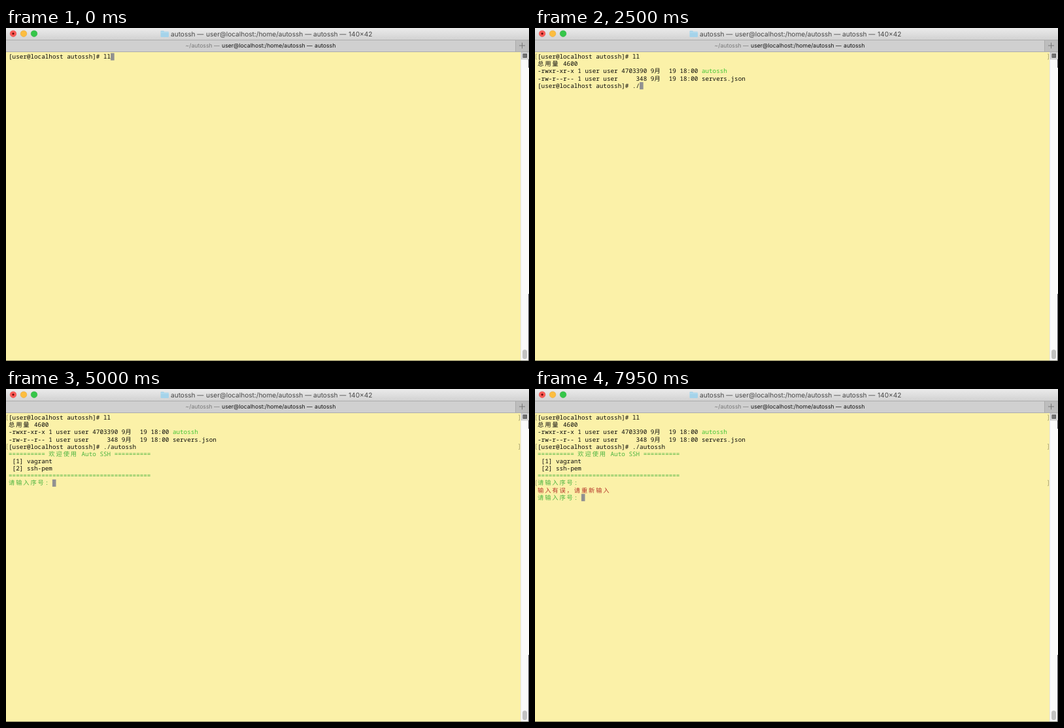
An HTML page that plays this animation: 800x511 px, repeating every 8000 ms.

```html
<!DOCTYPE html>
<html lang="en">
<head>
<meta charset="utf-8">
<title>Terminal session</title>
<style>
  html, body { margin: 0; width: 100%; height: 100%; overflow: hidden; background: #fbf1a8; }
  svg { display: block; width: 800px; height: 511px; }
  text { white-space: pre; text-rendering: geometricPrecision; }
  .title { font: 400 10.1px Inter, Roboto, sans-serif; fill: #474747; }
  .tab { font: 400 8.7px Inter, Roboto, sans-serif; fill: #111; }
  .tab .dim { fill: #777; }
  #screen { font: 500 9.29px "Noto Sans Mono", "Noto Sans CJK SC", "Noto Sans CJK", monospace; }
</style>
</head>
<body>
<svg viewBox="0 0 800 511">
  <defs>
    <linearGradient id="bar" x2="0" y2="1">
      <stop stop-color="#ebebeb"/>
      <stop offset="1" stop-color="#d2d2d2"/>
    </linearGradient>
  </defs>
  <rect width="800" height="511" fill="#fbf1a8"/>

  <rect width="800" height="18" fill="url(#bar)"/>
  <rect y="18" width="800" height="19" fill="#d0d0d0"/>
  <rect x="780" y="18" width="20" height="18" fill="#bdbdbd"/>
  <path d="M0 18.5H800M0 36.5H800M779.5 18V36" stroke="#acacac"/>
  <path d="M785 27H794M789.5 22.5V31.5" stroke="#777"/>

  <g stroke-width=".5">
    <circle cx="11" cy="8.7" r="4.8" fill="#fc5b56" stroke="#df4642"/>
    <circle cx="27" cy="8.7" r="4.8" fill="#fdbd3f" stroke="#dda034"/>
    <circle cx="43" cy="8.7" r="4.8" fill="#35c649" stroke="#27a835"/>
  </g>
  <circle cx="11" cy="8.7" r="1.6" fill="#6b0d0a"/>

  <path d="M236.5 5.2q0-.9.9-.9h3.6l1.3 1.2h5.8q.9 0 .9.9v6.6q0 .9-.9.9h-10.7q-.9 0-.9-.9z" fill="#a5d3ea"/>
  <path d="M236.5 6.9H249" stroke="#bfe1f1" stroke-width=".8"/>

  <g class="title">
    <text x="252" y="12.8">autossh —</text>
    <text x="306" y="12.8">user@localhost:/home/autossh —</text>
    <text x="470" y="12.8">autossh —</text>
    <text x="524" y="12.8">140×42</text>
  </g>
  <g class="tab">
    <text class="dim" x="274.5" y="30.2">~/autossh —</text>
    <text x="330" y="30.2">user@localhost:/home/autossh —</text>
    <text x="472" y="30.2">autossh</text>
  </g>

  <rect x="787" y="37" width="13" height="474" fill="#fafafa"/>
  <path d="M787.5 37V511" stroke="#e4e4e4"/>
  <rect x="790" y="493.5" width="7" height="14.5" rx="3.5" fill="#c2c2c2"/>
  <rect x="788.5" y="37.5" width="11" height="10.5" fill="#d9d9d9" stroke="#b5b5b5" stroke-width=".6"/>
  <rect x="790.5" y="39.5" width="6.5" height="6" fill="#444"/>
  <path d="M791 41.5H796.5M791 43.5H796.5" stroke="#ccc" stroke-width=".7"/>
  <path d="M799.5 48V61M799.5 408V511" stroke="#55555c"/>
  <path d="M0 510.6H800" stroke="#55533f" stroke-width=".8"/>

  <g id="screen"></g>
</svg>
<script>
const LOOP = 8000, CELL = 5.575, ROW = 11.14, LEFT = 4, TOP = 38.5;
const BLACK = '#0a0a08', LIME = '#43c535', GREEN = '#4cb440', RED = '#b5362a';

const prompt = '[user@localhost autossh]# ';
const ask = ['请输入序号: ', GREEN];
const command = text => [[prompt + text, BLACK]];
const listing = [
  command('ll'),
  [['总用量 4600', BLACK]],
  [['-rwxr-xr-x 1 user user 4703390 9月  19 18:00 ', BLACK], ['autossh', LIME]],
  [['-rw-r--r-- 1 user user     348 9月  19 18:00 servers.json', BLACK]]
];
const typed = text => [...listing, command(text)];
const menu = [
  ...typed('./autossh'),
  [['='.repeat(10) + ' 欢迎使用 Auto SSH ' + '='.repeat(10), GREEN]],
  [[' [1] vagrant', BLACK]],
  [[' [2] ssh-pem', BLACK]],
  [['='.repeat(39), GREEN]],
  [ask]
];

// start time, lines on screen, rows with a prompt mark
const steps = [
  [0, [command('ll')], []],
  [400, typed(''), [0]],
  [2100, typed('.'), [0]],
  [2300, typed('./'), [0]],
  [2700, typed('./a'), [0]],
  [2900, typed('./au'), [0]],
  [3200, typed('./autossh '), [0]],
  [3700, typed('./autossh '), [0, 4]],
  [4300, menu, [0, 4]],
  [7800, [...menu, [['输入有误，请重新输入', RED]], [ask]], [0, 4, 9]]
];

const screen = document.getElementById('screen');

function add(tag, attributes, content = '') {
  const node = document.createElementNS(screen.namespaceURI, tag);
  for (const key in attributes) node.setAttribute(key, attributes[key]);
  node.textContent = content;
  screen.append(node);
}

// Wide characters take two cells.
function drawLine(runs, row) {
  let column = 0;
  for (const [content, fill] of runs) {
    const x = [...content].map(char => {
      const left = LEFT + column * CELL;
      column += char > '\u2e80' ? 2 : 1;
      return left.toFixed(2);
    });
    add('text', { x: x.join(' '), y: TOP + row * ROW + 8.6, fill }, content);
  }
  return column;
}

function drawMark(row) {
  const y = TOP + row * ROW + 1.5;
  add('path', {
    d: `M3 ${y}H1.5v8H3M784 ${y}h1.5v8H784`,
    fill: 'none', stroke: '#a39d73', 'stroke-width': .8
  });
}

function draw([, lines, marks]) {
  screen.replaceChildren();
  marks.forEach(drawMark);
  const ends = lines.map(drawLine);
  const last = lines.length - 1;
  add('rect', {
    x: LEFT + ends[last] * CELL, y: TOP + last * ROW,
    width: CELL, height: ROW, fill: '#919191'
  });
}

let shown;
function tick() {
  const time = performance.now() % LOOP;
  const step = steps.findLast(([start]) => start <= time);
  if (step !== shown) draw(shown = step);
  requestAnimationFrame(tick);
}
tick();
</script>
</body>
</html>
```
